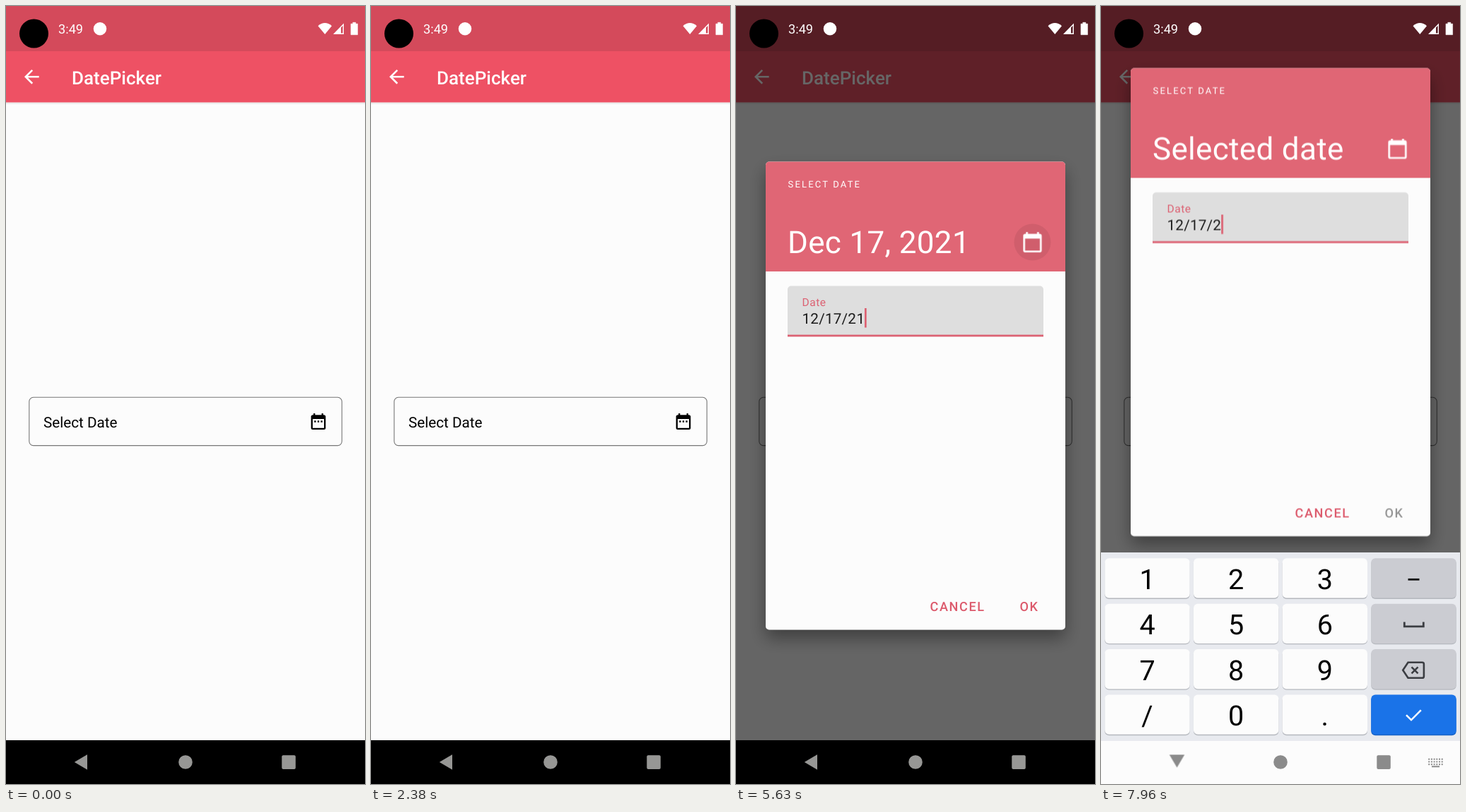
These frames come from a looping animation (508 px wide and 1102 px high, 8 s). An HTML page:

```html
<!DOCTYPE html>
<html lang="en">
<head>
<meta charset="utf-8">
<title>DatePicker</title>
<style>
html, body { margin: 0; width: 100%; height: 100%; overflow: hidden; background: #fcfcfc; }
svg { display: block; width: 508px; height: 1102px; }
text { font-family: Roboto, "Noto Sans", sans-serif; text-rendering: geometricPrecision; }
.mid { text-anchor: middle; }
.medium { font-weight: 500; }
.headline { font-size: 44px; letter-spacing: .32px; fill: #fff; }
.button { font-size: 18.1px; font-weight: 500; letter-spacing: 1.61px; }
.day { font-size: 15.5px; letter-spacing: .5px; }
.line { fill: none; stroke-width: 2.8; }

/* hard state changes */
.idle, .picked, .calendar, .edit, .caret, .last, .imeIcon { animation: 8s step-end infinite; }
.idle { animation-name: idle; }
.picked { animation-name: picked; }
.calendar { animation-name: calendar; }
.edit { animation-name: edit; }
.caret { animation-name: caret; }
.last { animation-name: last; }
.imeIcon { animation-name: imeIcon; }
@keyframes idle { 0% { opacity: 1 } 50% { opacity: 0 } 97.5%, 100% { opacity: 1 } }
@keyframes picked { 0% { opacity: 0 } 50% { opacity: 1 } 97.5%, 100% { opacity: 0 } }
@keyframes calendar { 0% { opacity: 1 } 68.125%, 100% { opacity: 0 } }
@keyframes edit { 0% { opacity: 0 } 68.125%, 100% { opacity: 1 } }
@keyframes last { 0% { opacity: 1 } 97.5%, 100% { opacity: 0 } }
@keyframes imeIcon { 0% { opacity: 0 } 76.25%, 100% { opacity: 1 } }
@keyframes caret {
  0% { opacity: 1; transform: none }
  75.625% { opacity: 0; transform: none }
  81.875% { opacity: 1; transform: none }
  88.125% { opacity: 0; transform: none }
  94.375% { opacity: 1; transform: none }
  97.5%, 100% { opacity: 1; transform: translateX(-11.8px) }
}

/* continuous motion */
.modal { animation: appear 8s linear infinite; }
.dialog { animation: pan 8s ease-out infinite; }
.keyboard { animation: rise 8s ease-out infinite; }
.ripple { animation: ripple 8s linear infinite; }
.nav { animation: tint 8s linear infinite; }
.back { transform-origin: 106px 1069.5px; animation: turn 8s ease-in-out infinite; }
@keyframes appear { 0%, 30.25% { opacity: 0 } 31.75%, 100% { opacity: 1 } }
@keyframes pan { 0%, 73.5% { transform: none } 76.8%, 100% { transform: translateY(-132.5px) } }
@keyframes rise { 0%, 73.5% { transform: translateY(330px) } 76.8%, 100% { transform: none } }
@keyframes ripple { 0%, 66.5% { opacity: 0 } 67.5%, 70.4% { opacity: .07 } 73%, 100% { opacity: 0 } }
@keyframes tint { 0%, 74.5% { fill: #979795 } 76.25%, 77.7% { fill: #c8c8c8 } 80%, 100% { fill: #8b8b8b } }
@keyframes turn { 0%, 77.8% { transform: none } 80%, 100% { transform: rotate(-90deg) } }
</style>
</head>
<body>
<svg viewBox="0 0 508 1102">
  <defs>
    <filter id="shade" x="-20%" y="-20%" width="140%" height="140%">
      <feDropShadow dx="0" dy="12" stdDeviation="12" flood-color="#000" flood-opacity=".38"/>
    </filter>
  </defs>

  <!-- page -->
  <rect width="508" height="1102" fill="#fcfcfc"/>
  <rect y="136" width="508" height="3" fill="#000" opacity=".06"/>
  <rect y="64" width="508" height="72.5" fill="#ee5164"/>
  <rect width="508" height="64" fill="#d44a5b"/>
  <path transform="translate(20.8 84.8) scale(1.293)" fill="#fff" d="M20 11H7.83l5.59-5.59L12 4l-8 8 8 8 1.41-1.41L7.83 13H20z"/>
  <text class="medium" x="93" y="110.5" font-size="26" fill="#fff">DatePicker</text>
  <rect x="32.8" y="554.3" width="442.5" height="68.3" rx="6" fill="none" stroke="#777" stroke-width="1.1"/>
  <text x="53" y="597" font-size="20.7">Select Date</text>
  <path transform="translate(428.2 574.7) scale(1.15)" d="M9 11H7v2h2zm4 0h-2v2h2zm4 0h-2v2h2zm2-7h-1V2h-2v2H8V2H6v2H5c-1.1 0-2 .9-2 2v14c0 1.1.9 2 2 2h14c1.1 0 2-.9 2-2V6c0-1.1-.9-2-2-2zm0 16H5V9h14z" fill-rule="evenodd"/>

  <g class="modal">
    <rect width="508" height="1040" opacity=".6"/>
    <g class="dialog">
      <rect x="42" y="220.5" width="424" height="663" rx="5" fill="#fcfcfc" filter="url(#shade)"/>
      <path d="M42 376V225.5a5 5 0 0 1 5-5h414a5 5 0 0 1 5 5V376z" fill="#e06675"/>
      <text x="73.5" y="256.8" font-size="13" letter-spacing="2.18" fill="#fff">SELECT DATE</text>
      <text class="headline idle" x="73" y="350">Selected date</text>
      <text class="headline picked" x="73" y="350">Dec 17, 2021</text>
      <circle class="ripple" cx="419.5" cy="334.5" r="26"/>

      <g class="calendar">
        <path transform="translate(403.2 318.2) scale(1.36)" fill="#fff" d="M3 17.25V21h3.75L17.81 9.94l-3.75-3.75zM20.71 7.04c.39-.39.39-1.02 0-1.41l-2.34-2.34c-.39-.39-1.02-.39-1.41 0l-1.83 1.83 3.75 3.75z"/>
        <text class="button" x="68.5" y="419" fill="#666">DECEMBER 2021</text>
        <path d="M243 409h14l-7 7z" fill="#666"/>
        <path class="line" d="M356 405l-7 7 7 7M411 405l7 7-7 7" stroke="#666"/>
        <g id="days" fill="#1c1c1c"></g>
        <circle cx="310.9" cy="629.7" r="23" fill="none" stroke="#111" stroke-width="1.4"/>
        <g class="picked">
          <circle cx="367.8" cy="629.7" r="23.3" fill="#e06675"/>
          <text class="day mid" x="368.1" y="635.8" fill="#fff">17</text>
        </g>
      </g>

      <g class="edit">
        <path transform="translate(403.8 318.9) scale(1.31)" fill="#fff" fill-rule="evenodd" d="M20 3h-1V1h-2v2H7V1H5v2H4c-1.1 0-2 .9-2 2v16c0 1.1.9 2 2 2h16c1.1 0 2-.9 2-2V5c0-1.1-.9-2-2-2zm0 18H4V8h16z"/>
        <path d="M73 468V401.5a5 5 0 0 1 5-5h352a5 5 0 0 1 5 5V468z" fill="#dedede"/>
        <rect x="73" y="465.6" width="362" height="2.8" fill="#dc6273"/>
        <text x="93.5" y="424.8" font-size="15.5" letter-spacing=".52" fill="#dc6273">Date</text>
        <text x="93.5" y="450" font-size="20.7" letter-spacing=".2" fill="#1c1c1c">12/17/2</text>
        <text class="last" x="170.4" y="450" font-size="20.7" fill="#1c1c1c">1</text>
        <rect class="caret" x="182" y="428" width="2.7" height="27.5" fill="#dc6273"/>
      </g>

      <text class="button" x="274.5" y="857" fill="#dc5a6c">CANCEL</text>
      <text class="button idle" x="401.5" y="857" fill="#959595">OK</text>
      <text class="button picked" x="401.5" y="857" fill="#dc5a6c">OK</text>
    </g>
  </g>

  <!-- status bar -->
  <circle cx="39.5" cy="39" r="20.5"/>
  <g fill="#fff">
    <text x="74" y="39.2" font-size="18.2">3:49</text>
    <circle cx="133" cy="32.3" r="9.2"/>
    <path d="M441.5 28.2Q451.3 20 461 28.2L451.3 40z"/>
    <path d="M463 40L478 24.5V40zM474 30.6V38.6H476.6V28z" fill-rule="evenodd"/>
    <path d="M488 25.2h2.8V23.3h4v1.9h2.8V40.7h-9.6z" stroke="#fff" stroke-width=".6" stroke-linejoin="round"/>
  </g>

  <!-- bottom -->
  <rect y="1040" width="508" height="62"/>
  <g class="keyboard">
    <rect y="774" width="508" height="267" fill="#e8eaef"/>
    <rect y="1041" width="508" height="62" fill="#fcfcfc"/>
    <g id="keys"></g>
    <g class="line" stroke="#3b3d42">
      <path d="M434.5 812.3h16" stroke="#111"/>
      <path d="M429.3 872.5v6.3h27v-6.3"/>
      <path d="M434.5 929.8h20q2.4 0 2.4 2.4v17.2q0 2.4-2.4 2.4h-20L427.2 940.8zM439.5 936.3l9 9m0-9l-9 9" stroke-width="2.6"/>
      <path d="M432 1004.3l7 7 13.8-14" stroke="#fff" stroke-width="2.5"/>
    </g>
  </g>
  <g class="nav">
    <path class="back" d="M96.8 1071l18.2-10.8V1081.8z" stroke-linejoin="round"/>
    <circle cx="254" cy="1071" r="9.8"/>
    <rect x="390.3" y="1061.3" width="19.5" height="19.7" rx="2"/>
    <g class="imeIcon" id="ime"></g>
  </g>
</svg>
<script>
const add = (id, tag, attrs, label = '') => {
  const el = document.createElementNS('http://www.w3.org/2000/svg', tag);
  for (const name in attrs) el.setAttribute(name, attrs[name]);
  el.textContent = label;
  document.getElementById(id).append(el);
};

// month grid: the first day falls on column 3
const colX = c => 83.6 + 56.87 * c;
[...'SMTWTFS'].forEach((d, c) =>
  add('days', 'text', { class: 'mid', x: colX(c), y: 481.6, 'font-size': 18.1 }, d));
for (let d = 1; d <= 31; d++) {
  const cell = d + 2;
  add('days', 'text', {
    class: 'day mid', x: colX(cell % 7) + .3, y: 532.4 + 51.75 * Math.floor(cell / 7)
  }, d);
}

// number pad
['123 ', '456 ', '789 ', '/0. '].forEach((row, r) => [...row].forEach((label, c) => {
  const x = 5.3 + 125.65 * c, y = 782.2 + 64.45 * r;
  const fill = c < 3 ? '#fcfcfc' : r < 3 ? '#cbccd2' : '#1a73e8';
  const shadow = c === 3 && r === 3 ? '#1762c6' : '#b5b8be';
  const key = { x, width: 120.4, height: 56.3, rx: 6 };
  add('keys', 'rect', { ...key, y: y + 1.4, fill: shadow });
  add('keys', 'rect', { ...key, y, fill });
  if (c < 3) add('keys', 'text', { class: 'mid', x: x + 60.2, y: y + 43.6, 'font-size': 39.5 }, label);
}));

// keyboard switch icon
for (let r = 0; r < 3; r++)
  for (let c = 0; c < 6; c++)
    add('ime', 'rect', { x: 463.2 + 3.7 * c, y: 1065.8 + 3.7 * r, width: 2, height: 2 });
add('ime', 'rect', { x: 468, y: 1076.3, width: 11, height: 2 });
</script>
</body>
</html>
```
